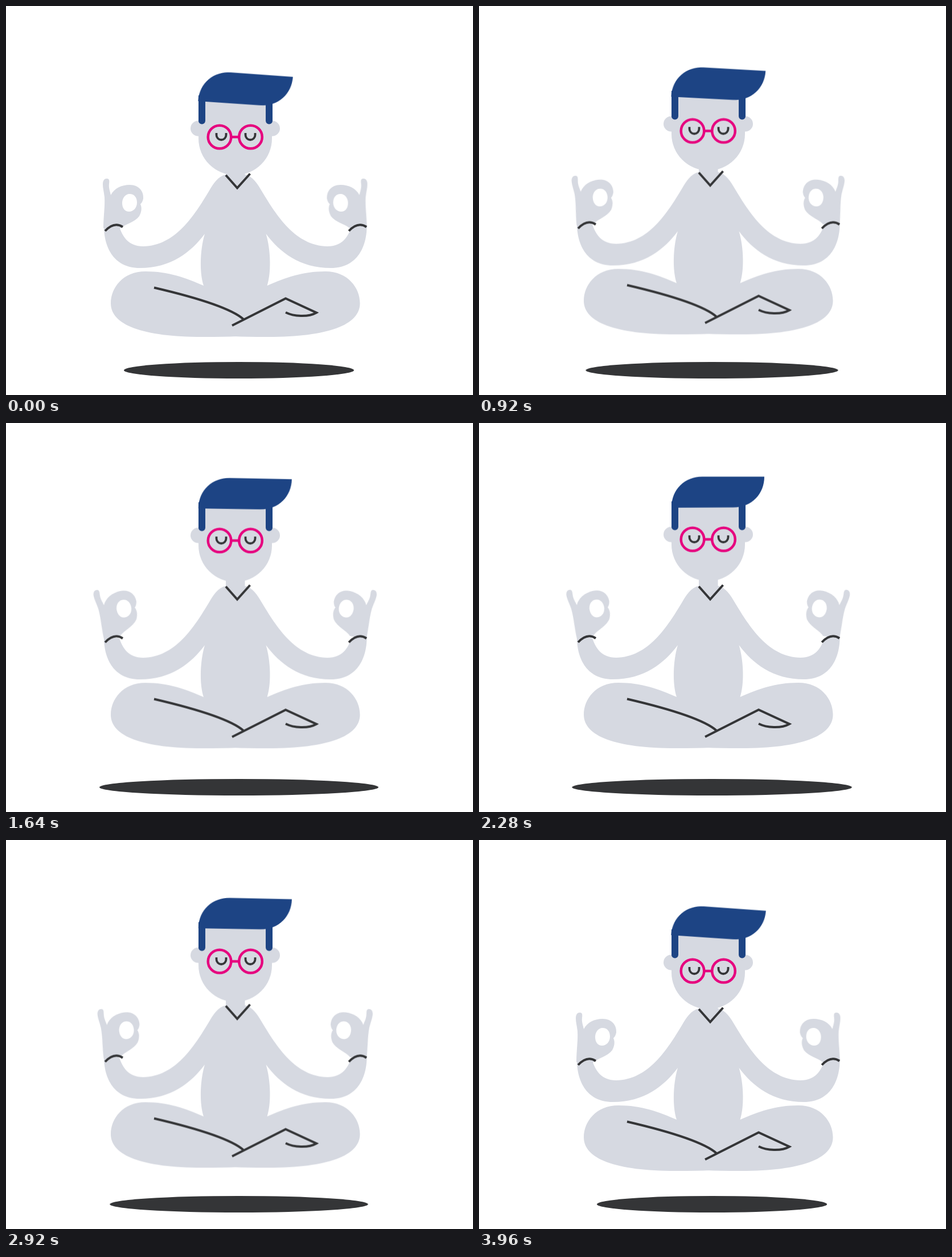
These frames come from a looping animation (820 px wide and 683 px high, 4 s). An HTML page:

```html
<!DOCTYPE html>
<html lang="en">
<head>
<meta charset="utf-8">
<title>Floating meditation</title>
<style>
  html, body { margin: 0; width: 100%; height: 100%; overflow: hidden; background: #fff; }
  svg { display: block; width: 100vw; height: 100vh; }
  .skin { fill: #d6d9e1; }
  .hair { fill: #1d4484; }
  .ink, .frame { fill: none; stroke: #343537; stroke-width: 4; }
  .frame { stroke: #e6007e; stroke-width: 4.5; }
  .hand { transform-origin: 168px 385px; }
  #hair { transform-origin: 350px 158px; }
  #shadow { fill: #343537; transform-origin: 409px 639.5px; }
</style>
</head>
<body>
<svg viewBox="0 0 820 683">
  <defs>
    <path id="half" d="M386 270V296C372 299 364 312 357 324C330 369 297 421 241 422
      C215 422 205 405 199 388L172 383C171 420 187 460 235 460C290 460 325 432 349 400
      C340 430 340 470 347 491C315 477 285 466 245 466C205 466 184 495 184 522
      C184 560 240 581 345 581Q385 581 405 580V270Z"/>
    <path id="palm" fill-rule="evenodd" d="M171 390C171 370 174 352 173 336C172 326 170 320 170 313
      C170 306 173 303 177 303C181 303 182 306 181 312C180 320 183 326 184 332
      C190 320 203 314 217 314C234 314 242 326 241 338Q240 344 236 348
      C239 354 238 362 234 369C226 380 208 383 200 391Z
      M217 330C209 330 204 338 204 346C204 355 209 361 216 361C224 361 230 354 230 345C230 336 225 330 217 330Z"/>
    <path id="cuff" class="ink" d="M174 395Q190 378 205 388"/>
    <path id="lid" class="ink" style="stroke-width:3.8" d="M369.5 223V226.5A8.5 8.5 0 0 0 386.5 226.5V223"/>
  </defs>

  <ellipse id="shadow" cx="409" cy="639.5" rx="202" ry="14.5"/>

  <g class="lift skin">
    <use href="#half"/>
    <use href="#half" transform="matrix(-1 0 0 1 805.5 0)"/>
    <g class="hand"><use href="#palm"/></g>
    <g transform="matrix(-1 0 0 1 804.5 0)"><g class="hand"><use href="#palm"/></g></g>
  </g>

  <g id="head">
    <path class="skin" d="M338 160H467V232.5A64.5 64.5 0 0 1 338 232.5Z"/>
    <circle class="skin" cx="337.5" cy="215" r="13.5"/>
    <circle class="skin" cx="467.5" cy="215" r="13.5"/>
    <path class="hair" d="M338 157H350V201.5A6 6 0 0 1 338 201.5Z"/>
    <path class="hair" d="M456 163H468V201.5A6 6 0 0 1 456 201.5Z"/>
    <path class="hair" id="hair" d="M338 168C338 135 362 113.5 392 113.5H501C501 143 480 167.5 446 167.5Z"/>
  </g>

  <g id="face">
    <use href="#lid"/>
    <use href="#lid" x="51"/>
    <circle class="frame" cx="375" cy="230" r="20.3"/>
    <circle class="frame" cx="429.5" cy="230" r="20.3"/>
    <path class="frame" d="M395 230H409"/>
  </g>

  <g class="lift">
    <path class="ink" d="M386 297L406 319.5L428.5 294.5"/>
    <use href="#cuff"/>
    <use href="#cuff" x="428"/>
    <path class="ink" d="M260 494.5C305 505 390 526 417 550"/>
    <path class="ink" d="M397 561L491 513.5L545 538.5C530 547 505 545 491 538"/>
  </g>
</svg>
<script>
  // start and peak are fractions of the loop; every part is back at rest at its end
  const breath = { start: 0, peak: 0.497, up: [0.36, 0, 0.67, 0.94], down: [0.33, 0.1, 0.67, 1] };
  const nod = { start: 0, peak: 0.53, up: [0.4, 0, 0.57, 1], down: [0.36, 0, 0.71, 1] };
  const sway = { start: 0.08, peak: 0.58, up: [0.333, 0, 0.667, 1], down: [0.333, 0, 0.667, 1] };

  const parts = [
    ['.lift', breath, 'translateY(0px)', 'translateY(-11px)'],
    ['.hand', breath, 'rotate(0deg)', 'rotate(-14.2deg)'],
    ['#shadow', breath, 'scaleX(1)', `scaleX(${250 / 202})`],
    ['#head', nod, 'translateY(0px)', 'translateY(-19.7px)'],
    ['#face', nod, 'translateY(0px)', 'translateY(-26.2px)'],
    ['#hair', sway, 'rotate(4.1deg)', 'rotate(0deg)'],
  ];

  const bezier = points => `cubic-bezier(${points})`;

  for (const [selector, { start, peak, up, down }, rest, top] of parts) {
    const steps = [
      { offset: 0, transform: rest },
      { offset: start, transform: rest, easing: bezier(up) },
      { offset: peak, transform: top, easing: bezier(down) },
      { offset: 1, transform: rest },
    ];
    for (const part of document.querySelectorAll(selector)) {
      part.animate(steps, { duration: 4000, iterations: Infinity });
    }
  }
</script>
</body>
</html>
```
